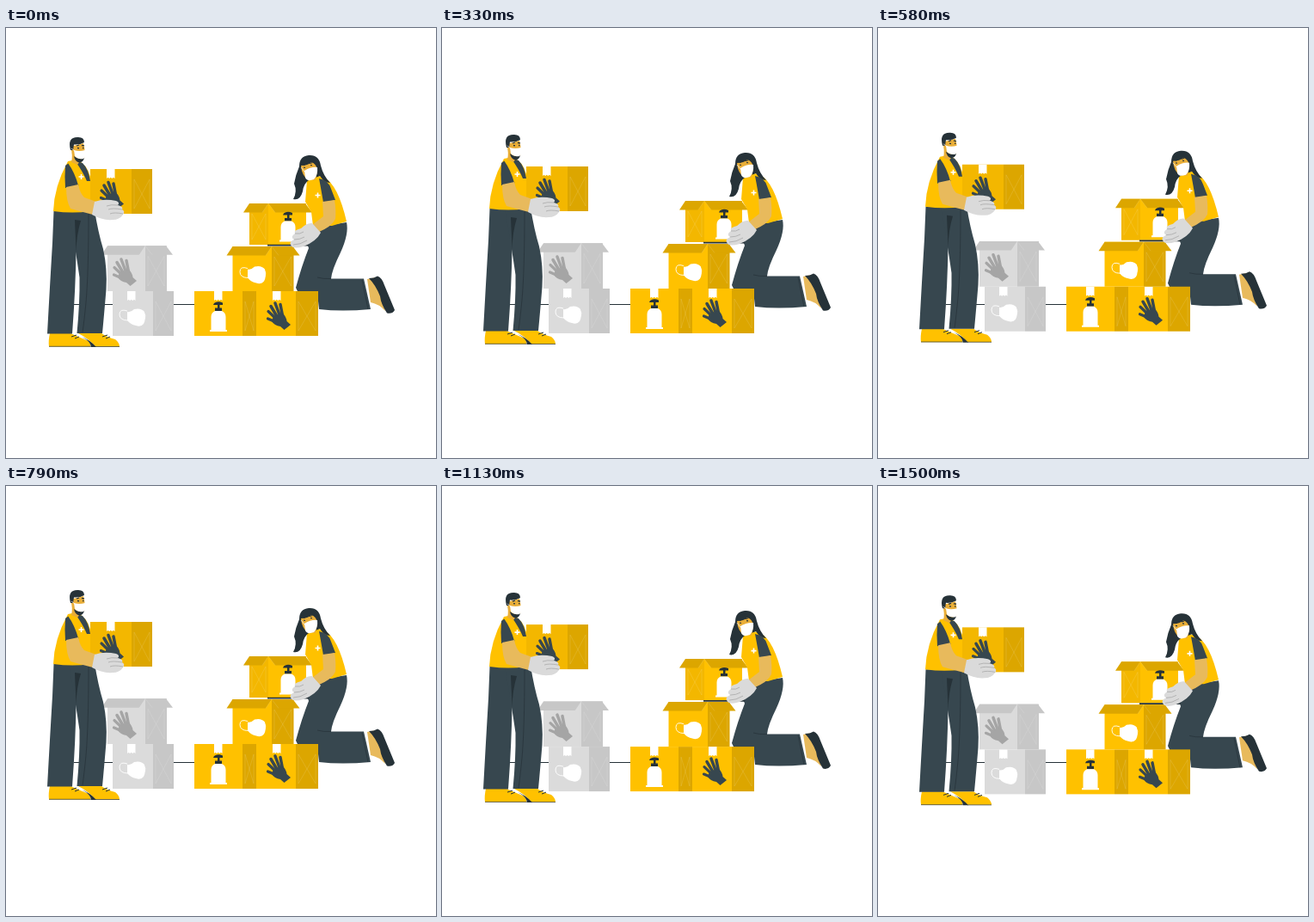
These frames come from a looping animation (500 by 500 pixels, 1.54 s). An HTML page with a canvas:

```html
<!DOCTYPE html>
<html lang="en">
<head>
<meta charset="utf-8">
<title>Packing boxes</title>
<style>
  html, body { margin: 0; width: 100%; height: 100%; overflow: hidden; background: #fff; }
  canvas { display: block; width: 500px; height: 500px; }
</style>
</head>
<body>
<canvas id="stage"></canvas>
<script>
const LOOP = 1540, PEAK = 725, RISE = 7;
const GOLD = '#ffc100', AMBER = '#f3b700', OCHRE = '#dca600';
const DARK = '#263238', CLOTH = '#37474f', SKIN = '#e8ba5c', FACE = '#e9ae38';
const GLOVE = '#dadada', CREASE = '#a2a2a2';
const GOLD_BOX = { front: GOLD, side: OCHRE, flap: OCHRE };
const GREY_BOX = { front: '#dbdbdb', side: '#c7c7c7', flap: '#c7c7c7' };

const canvas = document.getElementById('stage');
const ctx = canvas.getContext('2d');
const ratio = window.devicePixelRatio || 1;
canvas.width = canvas.height = 500 * ratio;

function fill(color, path) {
  ctx.fillStyle = color;
  ctx.fill(new Path2D(path));
}

function line(color, width, path) {
  ctx.strokeStyle = color;
  ctx.lineWidth = width;
  ctx.stroke(new Path2D(path));
}

function rect(color, x, y, w, h) {
  ctx.fillStyle = color;
  ctx.fillRect(x, y, w, h);
}

function at(x, y, draw) {
  ctx.save();
  ctx.translate(x, y);
  draw();
  ctx.restore();
}

function sideMarks(x, y, w, h) {
  const l = x + 3, r = x + w - 3, t = y + 12, b = y + h - 6;
  line('rgba(255,255,255,.2)', .6,
    `M${l} ${t}L${r} ${b}M${r} ${t}L${l} ${b}M${l} ${t}V${b}M${r} ${t}V${b}`);
}

function closedBox(x, y, front, side, colors, tapeX) {
  rect(colors.front, x, y, front, 52);
  rect(colors.side, x + front, y, side, 52);
  sideMarks(x + front, y, side, 52);
  fill('#fff', `M${tapeX} ${y}h9.5v11l-1.6-1.2-1.6 1.2-1.6-1.2-1.6 1.2-1.6-1.2-1.5 1.2z`);
}

// An open box whose two faces meet at the fold; flaps lean outward from the rim.
function openBox(x, y, left, right, h, leftColor, rightColor, flap, marksOnLeft) {
  const fold = x + left, end = fold + right;
  rect(leftColor, x, y, left, h);
  rect(rightColor, fold, y, right, h);
  if (marksOnLeft) sideMarks(x, y, left, h);
  else sideMarks(fold, y, right, h);
  fill(flap, `M${x} ${y}H${fold}l-7 10.5H${x - 7}z`);
  fill(flap, `M${fold} ${y}H${end - 1}l8 10.5H${fold + 8}z`);
  line('rgba(255,255,255,.25)', .5, `M${fold - 7} ${y + 10.5}L${fold} ${y}l8 10.5`);
}

function hand(color) {
  ctx.lineCap = 'round';
  line(color, 3.5, 'M6 6.5L14 20M11 3L17 19M17 4.5L20 20');
  line(color, 3.2, 'M3 12.5L13 22M2.5 21Q8 23 13 26');
  fill(color, 'M9 18L20 15Q24 19 24.5 24L29 28L21.5 34L17 30Q10 29 7 24z');
  ctx.lineCap = 'butt';
}

function faceMask() {
  line('#fff', .9, 'M10 4Q1 1 1 8Q1 15 11 15M28 5Q33 9 29 15');
  fill('#fff', 'M10 5Q14 6 18 2Q26 0 30 5Q32 14 29 19Q26 23 20 21Q14 20 10 15z');
}

function sanitizer() {
  fill(DARK, 'M5 2Q9-1 15 1.5V4H11.5V7.5H14V11H6V7.5H9V4H4z');
  fill('#fff', 'M6 11H14Q18.5 13 18.5 18V33H20V35H0V33H1.5V18Q1.5 13 6 11z');
}

function cross(x, y) {
  line('#fff', 1.6, `M${x - 3} ${y}h6M${x} ${y - 3}v6`);
}

function boxes() {
  closedBox(124, 306, 47, 24, GREY_BOX, 141);
  at(131, 325, faceMask);
  openBox(118, 253.3, 44, 25, 52.7, GREY_BOX.front, GREY_BOX.side, GREY_BOX.flap, false);
  at(123, 266, () => hand('#a5a5a5'));

  closedBox(219, 306, 56, 16, GOLD_BOX, 242);
  at(237, 318, sanitizer);
  closedBox(291, 306, 46, 26, GOLD_BOX, 310);
  at(302, 317, () => hand(CLOTH));
  openBox(263.5, 254, 45.5, 25.5, 52, GOLD, OCHRE, OCHRE, false);
  at(271, 275.5, faceMask);
  openBox(283, 204, 22, 44, 48, AMBER, GOLD, OCHRE, true);
  at(318, 213.5, sanitizer);
  line(DARK, 1.8, 'M304 252.7H352');
}

function womanLegs() {
  fill(SKIN, 'M420 292L430 290Q434 307 441 329Q434 321 424 319z');
  fill(CLOTH, 'M376 229L396 226Q399 239 389 261Q379 281 378 291.5L416 291.5L424 327Q390 330 364 327L362 308H340L337 302Q344 276 352 256L350 250Q360 238 376 229z');
  line(DARK, .7, 'M378 291.5Q369 292 362 290M414 293L421 327');
  fill(DARK, 'M422 291Q428 291 432 288.5Q437 290 440 299L452 328Q449 333 443 331.5Q436 321 435 312Q430 299 422 291z');
}

function woman() {
  fill(GOLD, 'M350 177Q360 169 370 174Q386 182 396 225L379 230H357L355 214L348 202z');
  fill(DARK, 'M341 161Q341 149 352 148Q364 147 366 160Q369 172 377 180Q370 180 365 172L352 177Q346 181 345 190Q342 201 334 199Q339 190 335 181Q337 170 341 161z');
  fill(FACE, 'M343 160Q351 160 355 156Q361 158 362 165L360 177L351 176Q344 172 343 160z');
  fill('#fff', 'M347 166Q355 161 362 162Q363 171 358 176Q350 179 348 174z');
  line('#fff', .7, 'M343 162L348 168');
  line(DARK, 1.1, 'M346 162l2 .5M354 159.5l2 .3M346 159.5l2-1M353 157.5l3-.8');
  fill(CLOTH, 'M364 175Q375 177 378 187L383 200L369 203Q367 191 364 175z');
  cross(362.5, 194.5);
  fill(SKIN, 'M368 202L382 200Q384 212 383 222Q379 231 362 238L356 229L369 219z');
  fill(GLOVE, 'M356 227L366 238Q361 248 346 254Q333 258 331 252Q329 249 335 246Q330 243 336 239Q334 235 343 233Q350 226 356 227z');
  line(CREASE, .7, 'M335 246Q342 246 347 243M336 239Q342 240 346 237M334 252Q342 252 350 247');
}

function manLegs() {
  fill(GOLD, 'M51 355H75Q84 359 96 364Q99 368 98 370.5H50Q49 364 51 355z');
  fill(GOLD, 'M84 355H111Q118 360 127 362Q132 366 132 370.5H104Q96 361 84 355z');
  fill(DARK, 'M88 359Q98 363 105 371H99Q98 364 88 359z');
  line(DARK, .7, 'M50 370.3H99M104 370.5H132');
  line(DARK, 1, 'M76 359l6-2M80 361l5-2M112 359l6-2M116 361l5-2');
  fill(CLOTH, 'M55.5 213H82L81.5 258Q81 302 77 355.5H48Q51 300 54 250z');
  fill(CLOTH, 'M73 213L103 212Q107 237 113 257Q118 280 116.5 304Q114 334 112 355H82.5Q86 318 85.5 290Q81 258 73 213z');
  fill(DARK, 'M80 223L87 224Q82 240 81.5 260z');
  line(DARK, .7, 'M96 216Q96 285 93 319Q91 340 89 354');
}

function man() {
  fill(GOLD, 'M72 155L82 153Q94 158 98 173V213Q78 216 55 213Q56 184 72 155z');
  fill(CLOTH, 'M80 154L89 157Q96 164 98 178L94 178Q90 168 80 154z');
  fill(CLOTH, 'M69 160L73 157Q81 168 85 183L69 186Q68 172 69 160z');
  fill(GOLD, 'M72 157L80 156Q86 166 92 178L84 183Q80 168 72 157z');
  fill(FACE, 'M75 138L90 134Q93 145 91 151L86 155L83 159L76 156Q78 148 75 138z');
  fill(DARK, 'M75 142Q71 127 83 127Q91 126.5 91 133Q86 136 79 135.5L78 142z');
  fill(DARK, 'M79 149Q85 154 91 151Q90 156 85 156.5Q80 155 79 149z');
  fill('#fff', 'M79 142Q85 144 92 142Q94 149 90 152Q84 153 80 149z');
  line('#fff', .7, 'M76 140L80 143');
  line(DARK, 1.3, 'M83 139.5l2 .3M89 139.5l1.5 .2M82 137l3-1M88 136.5l3 .4');
  cross(87.5, 173);

  closedBox(98, 164, 48, 24, { front: AMBER, side: OCHRE }, 117);
  at(108, 176.5, () => hand(CLOTH));

  fill(SKIN, 'M70 185L84 182Q86 192 91 197L105 202L101 217Q85 213 75 210Q70 202 70 185z');
  fill(GLOVE, 'M103 202Q114 198 128 201Q133 203 130 206Q137 208 135 211Q139 213 136 217Q132 223 124 223Q112 224 100 217z');
  line(CREASE, .7, 'M130 206Q122 205 117 207M135 211Q124 209 119 211M136 216Q126 214 121 216');
}

function lift(ms) {
  const fromPeak = Math.abs(ms % LOOP - PEAK);
  const distance = Math.min(fromPeak, LOOP - fromPeak);
  return RISE * (1 - distance / (LOOP / 2));
}

function render(ms) {
  ctx.setTransform(ratio, 0, 0, ratio, 0, 0);
  rect('#fff', 0, 0, 500, 500);
  line(DARK, 1, 'M79 321.5H219');
  ctx.translate(0, lift(0) - lift(ms));
  womanLegs();
  boxes();
  woman();
  manLegs();
  man();
}

let start;
function tick(now) {
  if (start === undefined) start = now;
  render(now - start);
  requestAnimationFrame(tick);
}
render(0);
requestAnimationFrame(tick);
</script>
</body>
</html>
```
